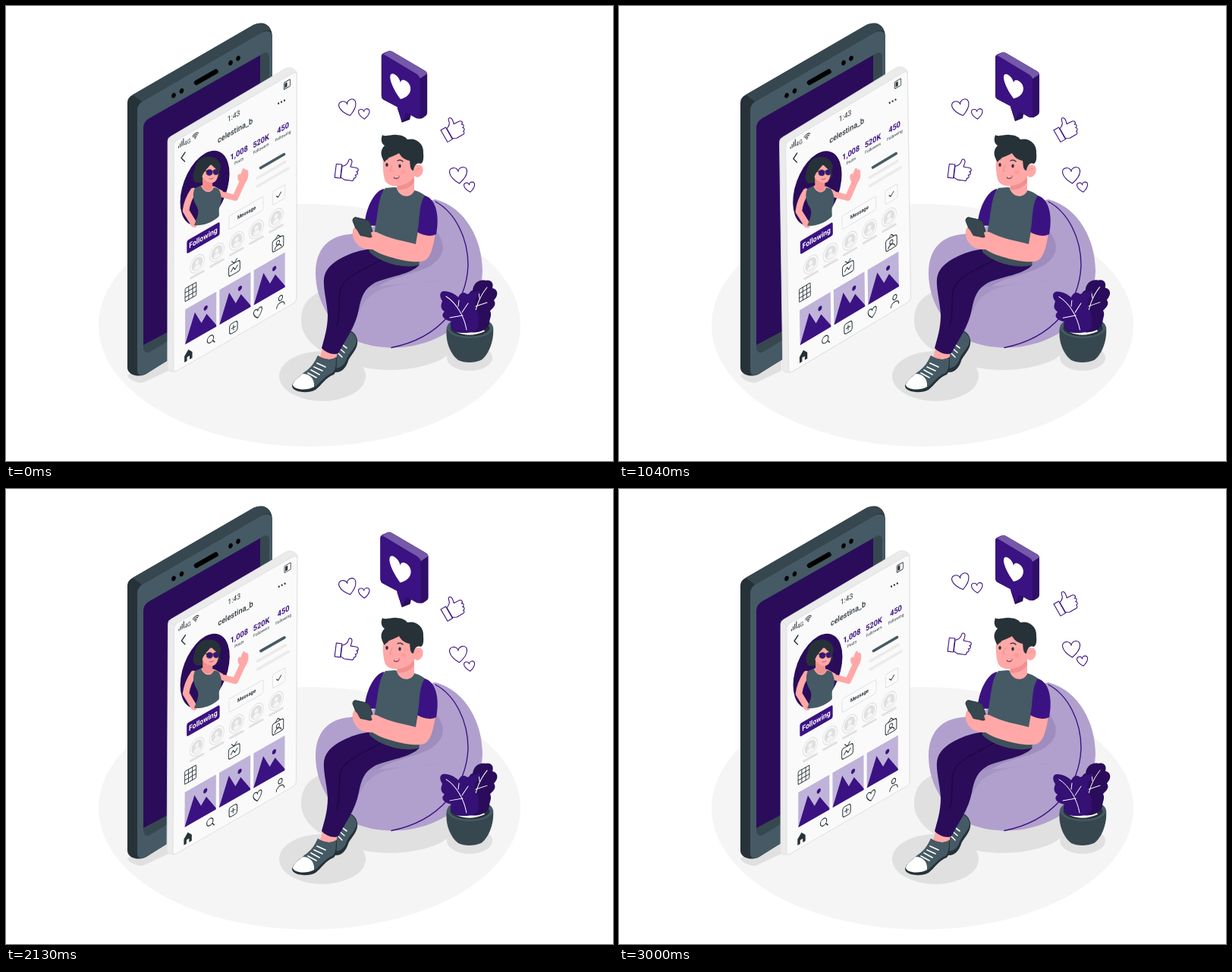
Recreate the animation shown at these times as an HTML page with a canvas. Size 800 by 600 pixels, loop 3.04 s.

```html
<!DOCTYPE html>
<html lang="en">
<head>
<meta charset="utf-8">
<title>Social profile</title>
<style>
html, body { margin: 0; width: 100%; height: 100%; overflow: hidden; background: #fff; }
canvas { display: block; }
</style>
</head>
<body>
<canvas id="stage" width="800" height="600"></canvas>
<script>
const ctx = document.getElementById('stage').getContext('2d');
const MAIN = '#3b1282', DEEP = '#2a0c5b', PALE = '#b1a0cd', INK = '#263238',
      SLATE = '#455a64', MID = '#37474f', SKIN = '#ffa8a7', GREY = '#e0e0e0', MIST = '#ebebeb';
const LOOP = 3040, FPS = 24;
ctx.lineCap = ctx.lineJoin = 'round';

function draw(d, fill, stroke, width = 1) {
  const p = typeof d === 'string' ? new Path2D(d) : d;
  if (fill) { ctx.fillStyle = fill; ctx.fill(p); }
  if (stroke) { ctx.strokeStyle = stroke; ctx.lineWidth = width; ctx.stroke(p); }
}
const line = (d, color, width) => draw(d, null, color, width);
function oval(x, y, rx, ry, fill, stroke, width, turn = 0) {
  const p = new Path2D();
  p.ellipse(x, y, rx, ry, turn, 0, 7);
  draw(p, fill, stroke, width);
}
function box(x, y, w, h, r, fill, stroke, width) {
  const p = new Path2D();
  p.roundRect(x, y, w, h, r);
  draw(p, fill, stroke, width);
}
function group(fn, ...m) {
  ctx.save();
  if (m.length) ctx.transform(...m);
  fn();
  ctx.restore();
}
// isometric plane facing left (-0.5) or right (0.5)
const iso = (x, y, fn, k = -0.5) => group(fn, 0.866, k, 0, 1, x, y);
function spin(x, y, deg, scale, fn) {
  const a = deg * Math.PI / 180, c = Math.cos(a) * scale, s = Math.sin(a) * scale;
  group(fn, c, s, -s, c, x, y);
}
const pivot = (x, y, deg, scale, fn) =>
  spin(x, y, deg, scale, () => group(fn, 1, 0, 0, 1, -x, -y));
function label(str, x, y, size, weight, color) {
  iso(x, y, () => {
    ctx.font = `${weight} ${size}px Roboto, Arial, sans-serif`;
    ctx.textAlign = 'center';
    ctx.textBaseline = 'middle';
    ctx.fillStyle = color;
    ctx.fillText(str, 0, 0);
  });
}
const HEART = 'M0,10C-14,0 -13,-10 -6,-10C-2,-10 0,-7 0,-5C0,-7 2,-10 6,-10C13,-10 14,0 0,10Z';

function ground() {
  oval(400, 421, 278, 160, '#f5f5f5');
  oval(417, 488, 57, 33, GREY);
  draw('M389,415C389,385 410,375 440,370L600,400C615,430 595,455 570,468C530,485 475,484 435,465C405,452 389,435 389,415Z', GREY);
  oval(611, 464, 30, 17, GREY);
  draw('M160,487L176,479L214,464V481L182,496C176,499 160,492 160,487Z', GREY);
}

function phone() {
  draw('M160,128C160,122 163,119 169,116L326,25C340,18 351,26 351,41V380L185,485C174,491 160,486 160,477Z', INK);
  draw('M173,138C173,132 176,128 181,125L335,36C344,31 351,33 351,42V385L184,485C177,489 173,486 173,480Z', SLATE);
  draw('M167,117L326,25C337,20 347,25 350,35C348,30 341,32 335,36L179,126Z', MID);
  draw('M181,162C181,155 184,151 189,148L338,63C343,60 347,62 347,67V360L190,456C185,459 181,456 181,450Z', MID);
  draw('M181,162C181,155 184,151 189,148L335,65V365L181,447Z', DEEP);
  for (const [x, y] of [[221, 118], [231.5, 112], [296, 75], [306, 69]]) oval(x, y, 2.6, 3.5, '#000', null, 0, 0.4);
  line('M251,101L276.500,86.500', '#000', 6.5);
}

function woman() {
  iso(262, 240, () => oval(0, 0, 37.5, 45.5, DEEP));
  draw('M250,233C244,226 247,220 249,214C251,203 260,197 270,199C279,200 284,207 281,215L282,224L276,232Z', INK);
  line('M287,249L302,253L312,231', SKIN, 8);
  draw('M306,230C304,224 306,220 309,222L311,217C312,213 315,213 315,216C318,215 320,218 319,221C320,227 316,234 312,236Z', SKIN);
  group(() => {
    const p = new Path2D();
    p.ellipse(262, 240, 38, 54, 0.3, 0, 7);
    ctx.clip(p);
    line('M247,244C243,250 238,261 237,270L248,288', SKIN, 8.5);
  });
  draw('M251,240L261,235L275,238L286,244L283,255L268,256L256,248Z', SKIN);
  draw('M249,240L257,237C260,246 270,249 274,239L280,241C285,250 285,258 281,266C280,272 282,276 280,278C270,287 258,290 248,289C253,277 256,270 250,262C246,254 246,246 249,240Z', SLATE);
  draw('M259,225L259,239C263,246 270,245 272,240L272,230Z', '#f28f8f');
  draw('M258,214C262,209 273,208 279,212C281,220 279,231 273,233C265,234 257,227 257,220Z', SKIN);
  draw('M250,226C247,203 266,194 280,205C284,210 283,215 281,218C276,215 272,211 270,208C266,215 260,217 257,229Z', INK);
  line('M260,217L266,218L278,217', INK, 1);
  oval(268, 219.500, 4, 3.8, MAIN, INK, 0.8);
  oval(276.500, 219, 3.4, 3.600, MAIN, INK, 0.8);
  line('M268,228Q270,229 273,227', '#b94b59', 0.9);
}

function photo(x, y) {
  iso(x, y, () => {
    box(-23.7, -23, 47.4, 46, 0, '#bfb3d9');
    draw('M-23.7,23L-9,-12L1,7L9,-1L23.7,21V23Z', MAIN);
    oval(7.500, -9.500, 3, 3, MAIN);
  });
}

function panelIcons() {
  for (let i = 0; i < 4; i++) line(`M${227.500 + i * 2.1},${187 - i * 1.2}v${-2 - i * 2.2}`, INK, 1);
  iso(249.500, 171, () => {
    for (const r of [2, 4.3, 6.500]) {
      const p = new Path2D();
      p.arc(0, 3.500, r, -2.35, -0.8);
      line(p, INK, 1.1);
    }
    oval(0, 3.500, 0.8, 0.8, INK);
  });
  iso(370, 103.500, () => {
    box(-4.5, -4.5, 9.500, 9, 1, null, INK, 0.9);
    box(-3.2, -3, 3.600, 6, 0, INK);
  });
  for (let i = 0; i < 3; i++) oval(359 + i * 3.9, 128.500 - i * 2, 1.1, 1.3, INK);
  line('M236,193L231,200.500L235.500,205', INK, 1.4);

  iso(243.500, 377, () => {
    box(-8.5, -8.500, 17, 17, 1, null, INK, 1);
    line('M-3,-8.500V8.500M3,-8.500V8.500M-8.500,-3H8.500M-8.500,3H8.500', INK, 1);
  });
  iso(301, 346, () => {
    box(-8.5, -7, 17, 14, 3, null, INK, 1.1);
    line('M-4,-11L0,-7L4,-11M-5,2L-1.500,-2L1,2L5,-2', INK, 1.1);
  });
  iso(358.500, 313, () => {
    box(-8.5, -7, 17, 15, 3, null, INK, 1.1);
    line('M-4,-7L0,-11L4,-7M-5,6C-4,1 4,1 5,6', INK, 1.1);
    oval(0, -1, 2.5, 2.5, null, INK, 1.1);
  });

  iso(240.500, 460, () => draw('M-6,7V-1L0,-7L6,-1V7H2V2H-2V7Z', INK));
  iso(270, 440, () => {
    oval(-0.5, -1, 4.8, 4.6, null, INK, 1.2);
    line('M3,2.500L6,6', INK, 1.3);
  });
  iso(300, 424, () => {
    box(-6, -6.500, 12, 13, 3, null, INK, 1.2);
    line('M-3,0H3M0,-3V3', INK, 1.2);
  });
  iso(332, 405, () => group(() => draw(HEART, null, INK, 2), 0.58, 0, 0, 0.62, 0, 0));
  iso(362, 389, () => {
    oval(0, -4, 3, 3.200, null, INK, 1.2);
    line('M-6,7C-6,0 6,0 6,7', INK, 1.2);
  });
}

function panel() {
  draw('M213,179C213,176 214,174 217,172L369,82C374,80 382,83 383,88V386L224,482L217,482C214,481 213,479 213,476Z', MIST, GREY, 0.8);
  draw('M221,185C221,181 222,179 225,177L377,89C381,87 383,88 383,92V384C383,388 382,390 379,392L226,481C223,483 221,482 221,478Z', '#fafafa', GREY, 1);
  line('M214,174L221,180', GREY, 0.8);
  label('4G', 239, 180, 8, 400, INK);
  label('1:43', 300, 145.500, 10, 400, INK);
  label('celestina_b', 302, 164.500, 10.5, 500, INK);
  label('1,008', 307, 194, 10.5, 700, MAIN);
  label('Posts', 307, 204.500, 5.6, 400, INK);
  label('520K', 336, 178.500, 10.5, 700, MAIN);
  label('Followers', 336, 188, 5.6, 400, INK);
  label('450', 365, 161, 10.5, 700, MAIN);
  label('Following', 365, 171.500, 5.6, 400, INK);
  line('M335.500,213.500L366.500,195.500', SLATE, 3.6);
  line('M331,227L368,205.500M331,238L372,214', MIST, 3.6);
  woman();

  iso(260, 306, () => box(-25, -9, 50, 17.500, 2.5, MAIN));
  label('Following', 260, 306, 10, 700, '#fff');
  iso(316.500, 273, () => box(-26, -9, 52, 18, 2.5, null, GREY, 1));
  label('Message', 317, 272.500, 6.8, 700, INK);
  iso(359.500, 249, () => {
    box(-9.500, -9, 19, 18, 2.5, null, GREY, 1);
    line('M-3.500,0L-1,2.500L3.500,-2', INK, 1.1);
  });

  for (let i = 0; i < 5; i++) {
    const x = 252 + 26 * i, y = 340 - 15.2 * i;
    iso(x, y, () => {
      oval(0, 0, 11, 11, null, GREY, 1);
      oval(0, 0, 8.500, 8.500, GREY);
      oval(0, -2, 2.8, 2.8, '#f5f5f5');
      draw('M-5,6C-5,0 5,0 5,6Q0,9 -5,6Z', '#f5f5f5');
    });
    line(`M${x - 8.500},${y + 19}l17,-9.500`, GREY, 2.8);
  }
  for (let i = 0; i < 3; i++) photo(256.800 + 45.2 * i, 411.5 - 26 * i);
  panelIcons();
}

function beanbag() {
  draw('M408,352C408,320 426,303 453,301C485,298 525,262 566,255C606,266 628,308 628,350C626,400 590,435 545,446C520,453 490,452 465,443C430,425 408,390 408,352Z', PALE);
  draw('M567,297C581,315 578,330 560,342C540,354 505,357 488,372C477,382 470,392 466,402L450,360L480,318L545,320Z', '#9f8dbd');
  draw('M578,361C548,366 510,364 488,377C470,387 461,405 456,432L444,438L450,390L478,371Z', '#a594c4');
  line('M566,258C592,272 609,306 609,342C607,392 572,438 508,450.500', MAIN, 1.4);
}

function shoes() {
  draw('M447,430C454,425 461,431 463,440C465,452 454,460 451,468C448,478 441,484 434,483L430,472L437,447Z', INK);
  draw('M447,431C454,427 460,432 462,440C463,449 452,457 449,465C446,474 440,479 432,477L431,468L438,448Z', SLATE);
  line('M441,445L449,451M439,451L446,457M437,457L443,463', '#fff', 1.6);
  draw('M418,449L437,456L434,471L413,466Z', SKIN);
  draw('M411,461C418,466 428,468 436,463C436,475 436,482 432,486C421,490 416,500 408,506C397,512 377,509 377,501C379,493 386,489 393,484C402,478 407,470 411,461Z', INK);
  draw('M411,461C418,466 428,468 435,463C435,475 434,481 430,484C419,488 414,498 406,503C396,508 378,506 378,499C380,493 386,489 393,483C402,477 407,470 411,461Z', SLATE);
  draw('M391,485C400,485 407,491 406,502C396,508 378,506 378,499C380,493 385,490 391,485Z', '#fff');
  line('M410,471L421,476M406,476L417,481M402,480L413,486M398,484L409,490', '#fff', 1.7);
}

function man() {
  shoes();
  draw('M482,320C455,323 425,337 420,355C416,367 424,393 424,408C424,425 419,440 416,451C421,457 432,461 438,458C448,439 461,422 465,400C468,384 472,373 486,365C503,357 535,354 545,341Z', DEEP);
  line('M497,333C475,347 446,356 441,373C437,389 441,405 436,422', '#1d0841', 1.4);
  draw('M498,241C485,244 475,266 473,284C475,290 487,292 494,287Z', MAIN);
  draw('M500,240C491,248 490,276 486,296C483,312 478,318 479,324C492,338 524,347 544,341C548,330 552,315 553,302L556,254C550,247 545,245 538,243L512,239Z', SLATE);
  draw('M486,312C505,322 530,330 547,326L543,342C524,347 492,338 479,324Z', '#3e5059');
  // arm and hand with phone
  draw('M543,296L566,300C563,316 561,329 553,335C546,340 525,336 513,333C503,330 492,327 483,321C470,322 460,315 457,304C456,294 459,289 463,292L476,298L488,298C505,307 525,310 540,314Z', SKIN);
  draw('M552,250C566,254 572,275 567,301C559,305 549,302 542,298C546,285 543,263 552,250Z', MAIN);
  draw('M457,283C457,280 459,278 462,279L475,282C478,283 479,284 480,287L484,301C484,304 482,305 479,305L468,303C465,302 464,300 463,298Z', MID, INK, 1);
  draw('M458,293C461,291 464,298 467,303L477,305C481,309 476,313 470,312C463,311 457,303 458,293Z', SKIN);
  draw('M481,299C486,295 491,300 490,304L484,309Z', SKIN);
  // head
  draw('M516,230L538,224L538,244C534,253 520,254 515,241Z', SKIN);
  draw('M516,237C526,236 532,230 537,224L538,232C533,240 525,243 516,242Z', '#f28f8f');
  draw('M498,190C496,204 496,221 500,231C506,240 519,238 528,234C535,230 540,224 541,216L543,188L520,179Z', SKIN);
  oval(543, 217.500, 6.500, 8.500, SKIN, null, 0, 0.3);
  draw('M499,206C493,197 493,190 499,184C494,181 494,175 496,170C500,173 508,169 515,170C522,170 527,173 529,176C541,173 551,182 550,194C551,203 549,208 546,208C540,206 538,212 537,217C532,216 533,210 532,204C525,203 520,198 518,194C511,199 503,198 499,206Z', INK);
  line('M540,217Q543,212 546,215', '#f28f8f', 1);
  oval(502, 209.500, 1.7, 2.400, INK);
  oval(519, 211, 1.7, 2.400, INK);
  line('M500,203L503,201.500M516,204Q520,202 523,205', INK, 1.3);
  line('M509,210L506,217L509,218', '#f28f8f', 1.2);
  draw('M511,225Q515,226 519,223.500Q518,230 511,227.500Z', '#a84555');
  line('M512.500,225.800Q515,226.500 517.500,225', '#fff', 1);
  oval(524, 219, 3.500, 2.800, '#ff9c9a');
}

function plant(sway) {
  draw('M581,423L642,423C644,444 634,462 626,467C617,471 604,471 596,467C587,460 578,444 581,423Z', MID);
  oval(611.5, 424, 30.500, 14, SLATE);
  oval(611.5, 425, 26, 10.500, INK);
  draw('M594,430Q611,438 631,429L626,421H598Z', '#fafafa');
  pivot(610, 397, sway, 1, () => {
    draw('M611,430C605,413 607,400 610,390C608,381 611,376 615,375C616,365 624,360 632,362C640,360 643,366 641,372C648,373 650,381 643,388C647,394 642,398 638,402C641,408 637,412 637,419C634,428 622,432 611,430Z', DEEP);
    line('M618,416C617,399 625,382 634,371M618,400L614,391M619,396L634,391M624,385L623,377', '#fff', 1);
    draw('M604,431C590,432 583,424 587,416C577,414 572,408 578,403C571,398 574,393 575,389C571,383 571,377 577,376C585,376 592,380 596,384C599,378 603,376 608,380C613,378 620,375 625,377C620,384 616,390 618,399C624,406 624,413 622,418C627,425 615,432 604,431Z', '#351075');
    line('M580,383C593,391 604,409 607,427M596,396L597,388M601,404L609,392M602,408L585,411', '#fff', 1);
  });
}

function bubble(scale) {
  pivot(525, 106.500, 0, scale, () => {
    draw('M516,133L522,152L532,148L534,139Z', DEEP);
    draw('M496,68C496,64 499,64 504,61.500C506,60.500 508,61 510,62L551,86C553,87.500 554,89 554,91V139C554,142 553,143 550,145C547,147 545,148 541,146L533,140L522,151L516,132L499,123C497,122 496,120 496,117Z', '#2f0e68');
    draw('M497,66L504,61.700C506,60.500 508,61 510,62L551,86C553,87.300 554,88.500 554,90L545,96Z', '#7659a8');
    draw('M496,69C496,65 498,65 501,66.500L540,90C543,92 545,94 545,98V142C545,147 543,148 539,146L527,139L522,151L516,132L499,123C497,122 496,120 496,117Z', MAIN);
    iso(520, 108.5, () => group(() => draw(HEART, '#fff'), 1.36, 0, 0, 1.36, 0, 0), 0.5);
  });
}

function heart(x, y, deg, scale) {
  spin(x, y, deg, scale, () => draw(HEART, '#fff', MAIN, 1.1 / scale));
}
function thumb(x, y, deg) {
  spin(x, y, deg, 1, () => {
    draw('M-15,-6H-7.500V12H-15Z', '#fff', MAIN, 1.1);
    draw('M-7,-4C-3,-5 0,-8 0.500,-12C1,-16 6,-15 5,-9L4,-4.500L12,-4C15.500,-3.500 15.500,0.500 12.500,1C15.500,2 14.500,5.500 11.500,5.500C14,7 12.500,10 10,10C11,12.500 9,14 7,13.500H-2L-7,11Z', '#fff', MAIN, 1.1);
  });
}
function reactions(dy) {
  group(() => {
    heart(451, 134.500, -14, 1.03);
    heart(472, 142.500, -4, 0.66);
    heart(596.500, 223.500, -5, 1.05);
    heart(611, 239, -8, 0.64);
    thumb(449.500, 216, 7);
    thumb(589, 161.5, -30);
  }, 1, 0, 0, 1, 0, dy);
}

// piecewise linear keyframes: [position, value] pairs
function tween(keys, p) {
  const i = keys.findIndex(k => k[0] > p), [a, u] = keys[i - 1], [b, v] = keys[i];
  return u + (v - u) * (p - a) / (b - a);
}
const BEAT = [[0, 1], [0.1, 1.3], [0.3, 1], [0.4, 1], [0.5, 1.3], [0.6, 1], [1.01, 1]];
const WIND = [[0, 0], [0.25, 1], [0.75, -1], [1.001, 0]];

function render(now) {
  const step = Math.floor((now % LOOP + 5) * FPS / 1000);
  const time = Math.min(step * 1000 / FPS + 20, 3000);
  const p = time % 1500 / 1500, sway = tween(WIND, p);
  ctx.fillStyle = '#fff';
  ctx.fillRect(0, 0, 800, 600);
  ground();
  phone();
  pivot(298, 283, sway, 1, panel);
  beanbag();
  man();
  plant(sway);
  reactions(-12 * Math.max(0, time / 1500 - 1));
  bubble(tween(BEAT, p));
}

let start;
function tick(now) {
  start ??= now;
  render(now - start);
  requestAnimationFrame(tick);
}
render(0);
requestAnimationFrame(tick);
</script>
</body>
</html>
```
